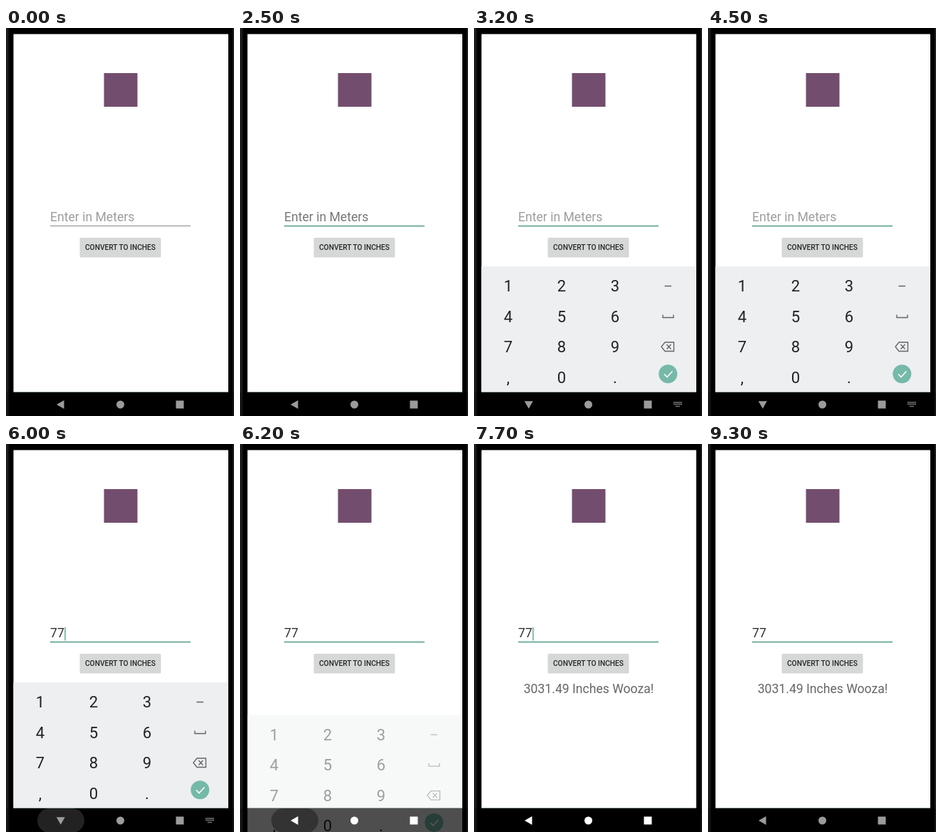
These frames come from a looping animation (320 by 542 pixels, 9.4 s). An HTML page:

```html
<!DOCTYPE html>
<html>
<head>
<meta charset="utf-8">
<style>
  html, body { margin: 0; width: 100%; height: 100%; overflow: hidden; background: #000; }
  svg { display: block; width: 320px; height: 542px; font-family: Roboto, sans-serif; }
  #keys { font-size: 22px; text-anchor: middle; fill: #222; }
  .thin { fill: none; stroke: #666; stroke-width: 1.4; }
</style>
</head>
<body>
<svg viewBox="0 0 320 542">
  <rect width="320" height="542"/>
  <rect width="3" height="542" fill="#1d1d1d"/>
  <rect x="3" width="1.5" height="542" fill="#101010"/>
  <rect x="318" width="2" height="542" fill="#1d1d1d"/>
  <rect x="10.5" y="8.5" width="301.5" height="500" fill="#fff"/>

  <rect x="137.5" y="63" width="47" height="47" fill="#734d6e"/>

  <text id="field" x="62" y="270" font-size="17.6"></text>
  <rect id="line" x="62" width="197"/>
  <rect id="cursor" y="256" width="1.3" height="18.5" fill="#559a8a"/>
  <rect id="button" x="103.5" y="293" width="114" height="27.5" rx="1.5"/>
  <text x="160.5" y="310.3" font-size="10.2" font-weight="500" text-anchor="middle" fill="#272727">CONVERT TO INCHES</text>
  <text id="result" x="161" y="347.5" font-size="17.6" text-anchor="middle" fill="#666">3031.49 Inches Wooza!</text>

  <g id="keyboard">
    <rect x="10.5" y="333" width="301.5" height="175.5" fill="#edeff1"/>
    <g id="keys"></g>
    <path class="thin" d="M267.5 360.5h9.5M265 400.500v4h15v-4"/>
    <path class="thin" d="M268 439h12.500v12.500h-12.500l-5-6.250zM270.500 442l6 6.500m0-6.500l-6 6.500"/>
    <circle cx="272.300" cy="483.300" r="13" fill="#75b9a9"/>
    <path d="M267 483.500l4 4 7.500-8" fill="none" stroke="#fff" stroke-width="1.600"/>
  </g>

  <rect y="508.500" width="320" height="33.500" opacity=".24"/>
  <rect x="10.500" y="508" width="301.500" height="1" fill="#9dbdb0" opacity=".6"/>
  <rect id="ripple" x="44" y="509" width="66" height="34" rx="17" fill="#222"/>
  <g id="nav">
    <path id="back" d="M71 526l10.500-6v12z"/>
    <circle cx="160.500" cy="526" r="5.500"/>
    <rect x="238.500" y="520.500" width="11" height="11"/>
    <path id="switcher" d="M280 523h12M280 525.500h12M283 528.500h6" stroke-width="1.500" stroke-dasharray="1.500 .6" fill="none"/>
  </g>
</svg>
<script>
const LOOP = 9400;
const $ = id => document.getElementById(id);
const set = (id, attrs) => {
  for (const name in attrs) $(id).setAttribute(name, attrs[name]);
};
const clamp = v => Math.max(0, Math.min(1, v));
const between = (t, from, to) => t >= from && t < to;

$('keys').innerHTML = ['123', '456', '789', ',0.'].map((row, r) =>
  [...row].map((key, c) => `<text x="${48 + 75 * c}" y="${368.3 + 42.4 * r}">${key}</text>`).join('')
).join('');

function draw(t) {
  const focused = t >= 2500;
  const typed = t >= 5700 ? '77' : t >= 5300 ? '7' : '';
  const hintColor = between(t, 2500, 2700) ? '#777' : '#9c9c9c';
  $('field').textContent = typed || 'Enter in Meters';
  set('field', { fill: typed ? '#303030' : hintColor });
  set('line', focused
    ? { y: 275.8, height: 1.6, fill: '#5b9f8f' }
    : { y: 276, height: 1, fill: '#888' });

  const cursorOn = t >= 2700 && Math.floor((t - 2700) / 500) % 2 === 0;
  set('cursor', { x: 62.5 + 9.9 * typed.length, opacity: +cursorOn });

  set('button', { fill: between(t, 7250, 7500) ? '#cccdcd' : '#d6d7d7' });
  set('result', { opacity: +(t >= 7300) });

  // The keyboard slides and fades in, then leaves the same way
  const shown = clamp(Math.min(t - 2800, 6250 - t) / 200);
  const hidden = (1 - shown) ** 2;
  set('keyboard', { transform: `translate(0 ${80 * hidden})`, opacity: 1 - hidden });

  const typing = between(t, 2600, 6200);
  set('back', { transform: typing ? 'rotate(-90 76.75 526)' : '' });
  set('switcher', { opacity: +typing });
  set('ripple', { opacity: t < 5900 ? 0 : clamp((6350 - t) / 250) });

  const bright = clamp(Math.min((t - 6000) / 200, (8900 - t) / 400));
  const gray = Math.round(155 + 100 * bright);
  const color = `rgb(${gray},${gray},${gray})`;
  set('nav', { fill: color, stroke: 'none' });
  set('switcher', { stroke: color });
}

function frame() {
  draw(performance.now() % LOOP);
  requestAnimationFrame(frame);
}
frame();
</script>
</body>
</html>
```
